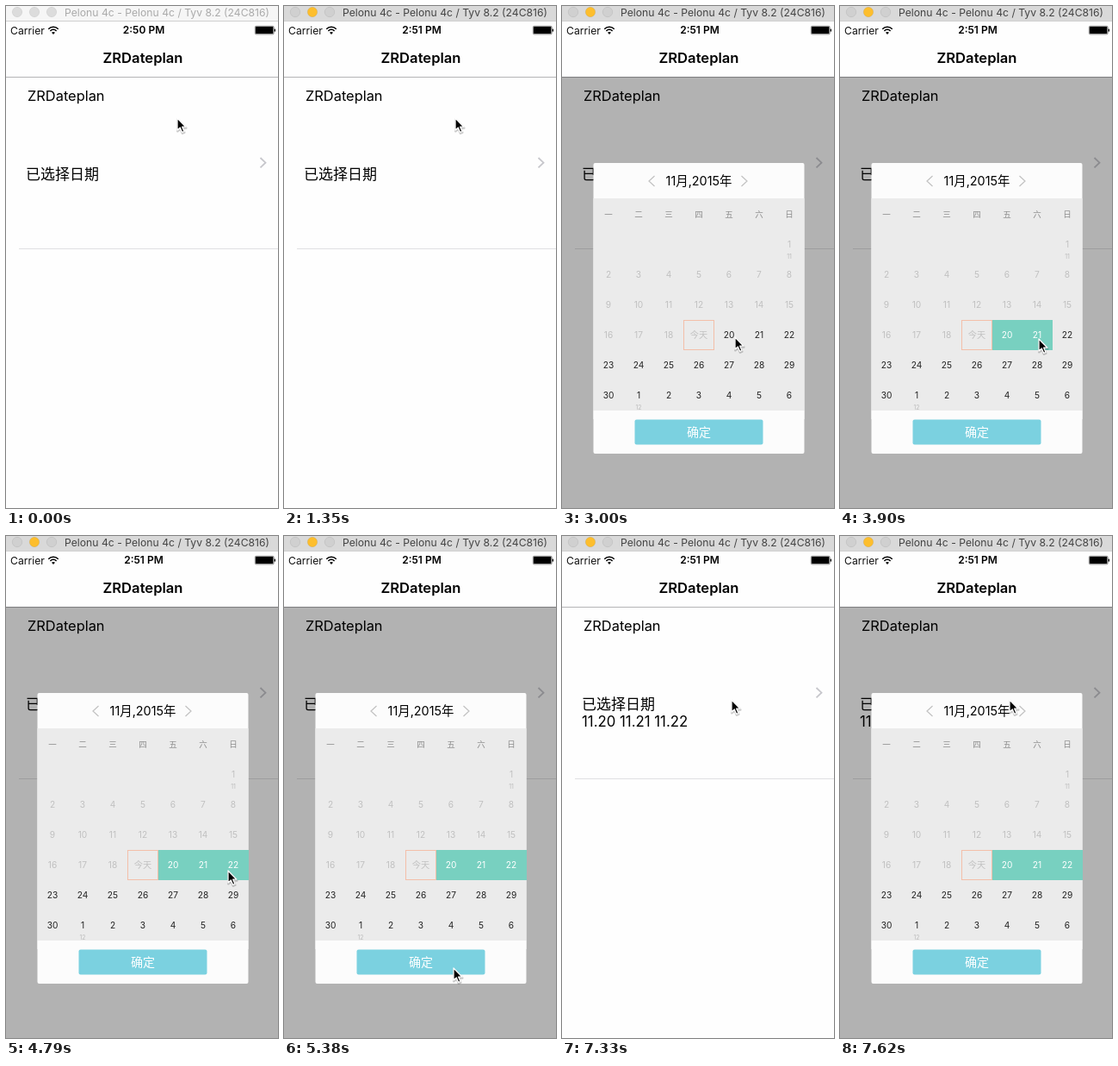
These frames come from a looping animation (316 px wide and 582 px high, 8000 ms). An HTML page:

```html
<!DOCTYPE html>
<html lang="zh-CN">
<head>
<meta charset="utf-8">
<style>
  html, body { margin: 0; height: 100%; overflow: hidden; background: #fefefe; }
  svg { display: block; width: 100vw; height: 100vh; }
  text { font-family: Inter, "Noto Sans CJK SC", sans-serif; }
</style>
</head>
<body>
<svg id="stage" viewBox="0 0 316 582"></svg>
<script>
const LOOP = 8000;
const CELL = 35, LEFT = 36.5;
const TODAY = 19;
const pickTimes = [3450, 3900, 4790];

// Pointer tip: [time, x, y], held until the next entry
const pointerPath = [
  [0, 199, 130],
  [2250, 200, 172], [2400, 204, 318], [2550, 206, 381],
  [3000, 201, 384], [3150, 199, 385],
  [3600, 220, 385], [3900, 231, 386],
  [4050, 243, 387], [4200, 254, 388], [4340, 258, 388],
  [4940, 252, 406], [5090, 224, 456], [5240, 202, 492], [5380, 197, 501],
  [6730, 194, 470], [6880, 187, 365], [7030, 187, 262], [7180, 194, 204], [7330, 197, 190]
];

const rect = (x, y, w, h, fill, extra = '') =>
  `<rect x="${x}" y="${y}" width="${w}" height="${h}" fill="${fill}" ${extra}/>`;

const label = (str, x, y, size, fill = '#000', extra = 'text-anchor="middle"') =>
  `<text x="${x}" y="${y + size * 0.37}" font-size="${size}" fill="${fill}" ${extra}>${str}</text>`;

const line = (d, stroke, width = 1) =>
  `<path d="${d}" fill="none" stroke="${stroke}" stroke-width="${width}"/>`;

const columnX = c => LEFT + CELL * (c + 0.5);
const rowY = r => 276.5 + CELL * r;

function titleBar() {
  const dots = [13, 33, 53].map((x, i) =>
    `<circle id="dot${i}" cx="${x}" cy="7" r="5.7" stroke="#000" stroke-opacity=".07"/>`).join('');
  return rect(0, 0, 316, 18, '#f6f6f6', 'id="bar"') + rect(0, 17, 316, 1, '#d0d0d0') + dots +
    label('Pelonu 4c - Pelonu 4c / Tyv 8.2 (24C816)', 68, 7.5, 12.2, '#aaa', 'id="title"');
}

function statusBar() {
  const arc = r => {
    const k = r * 0.72;
    return line(`M${55 - k} ${32.5 - k}A${r} ${r} 0 0 1 ${55 + k} ${32.5 - k}`, '#000', 1.5);
  };
  return label('Carrier', 5, 28, 12.2, '#111', '') +
    arc(8) + arc(5) + '<path d="M55 33L53 30.8A3 3 0 0 1 57 30.8Z"/>' +
    label('', 160, 28, 12, '#000', 'id="clock" text-anchor="middle" font-weight="600"') +
    rect(289.3, 23.3, 21.8, 9.5, 'none', 'rx="1.5" stroke="#000" stroke-width=".5"') +
    rect(290, 24, 20.4, 8.1, '#000', 'rx=".8"') + rect(311.7, 26.5, 1.3, 3.2, '#000', 'rx=".6"');
}

function page() {
  return label('ZRDateplan', 159, 60, 16.6, '#000', 'text-anchor="middle" font-weight="600"') +
    rect(0, 82, 316, 1, '#b4b4b6') +
    label('ZRDateplan', 25, 104, 16.4, '#000', '') +
    label('已选择日期', 23, 195, 17, '#000', '') +
    label('11.20 11.21 11.22', 23, 215, 16.8, '#000', 'id="chosen"') +
    line('M295.5 176L301.5 181.7L295.5 187.4', '#c7c7cc', 1.8) +
    rect(15, 281, 301, 1, '#e0e0e2');
}

function calendar() {
  let out = rect(0, 82, 316, 500, '#000', 'opacity=".3"') +
    rect(LEFT, 182, 245, 337, '#fcfcfc', 'rx="2"') +
    rect(LEFT, 223, 245, 246, '#ebebeb') +
    line('M107.5 197L101 203L107.5 209M208.5 197L215 203L208.5 209', '#c2c2c2', 1.2) +
    label('11月,2015年', 159, 203, 14.4);

  [...'一二三四五六日'].forEach((name, c) => out += label(name, columnX(c), 241.5, 9.5, '#8c8c8c'));

  pickTimes.forEach((_, i) => out += rect(LEFT + CELL * (4 + i), 364, CELL, 35, '#78d0c0',
    `id="pick${i}" shape-rendering="crispEdges"`));
  out += `<rect x="141.5" y="364.5" width="35" height="34" fill="none" stroke="#f3bfa9"/>`;

  for (let day = 1; day <= 36; day++) {
    const slot = day + 5, x = columnX(slot % 7), y = rowY(Math.floor(slot / 7));
    const date = day > 30 ? day - 30 : day;
    out += label(day === TODAY ? '今天' : date, x, y, 10.2,
      day <= TODAY ? '#c0c0c0' : '#222', `id="day${day}" text-anchor="middle"`);
    if (date === 1) out += label(day === 1 ? 11 : 12, x, y + 14, 7, '#bbb');
  }

  return out + rect(LEFT, 469, 245, 10, '#fcfcfc') +
    rect(84.5, 479.5, 149, 29, '#7bd1e0', 'rx="2"') +
    label('确定', 159, 494, 14, '#fff');
}

const arrow = 'M0 0V14L3.3 11L5.7 16.4L8 15.4L5.7 10.2H10Z';
const pointer = `<g id="pointer" stroke-linejoin="round">
  <path d="${arrow}" transform="translate(.3 1.3)" stroke="#000" stroke-width="2.5" opacity=".2"/>
  <path d="${arrow}" stroke="#fff" stroke-width="1.3"/>
</g>`;

document.getElementById('stage').innerHTML = rect(0, 0, 316, 582, '#fefefe') +
  titleBar() + statusBar() + page() + `<g id="calendar">${calendar()}</g>` + pointer;

const el = id => document.getElementById(id);
const paint = (id, fill) => el(id).setAttribute('fill', fill);
const show = (id, on) => el(id).setAttribute('visibility', on ? 'inherit' : 'hidden');

function render(t) {
  const active = t >= 1350;
  paint('bar', active ? '#d9d9d9' : '#f6f6f6');
  paint('title', active ? '#444' : '#aaa');
  [0, 1, 2].forEach(i => paint('dot' + i, !active ? '#dcdcdc' : i === 1 ? '#fdbe2d' : '#d0d0d0'));

  el('clock').textContent = t < 900 ? '2:50 PM' : '2:51 PM';
  show('chosen', t >= 5830);
  show('calendar', t >= 1650 && t < 5830 || t >= 7620);

  pickTimes.forEach((time, i) => {
    show('pick' + i, t >= time);
    paint('day' + (20 + i), t >= time ? '#fff' : '#222');
  });

  const [, x, y] = pointerPath.findLast(p => p[0] <= t);
  el('pointer').setAttribute('transform', `translate(${x} ${y})`);
}

const start = performance.now();
function tick() {
  render((performance.now() - start) % LOOP);
  requestAnimationFrame(tick);
}
tick();
</script>
</body>
</html>
```
